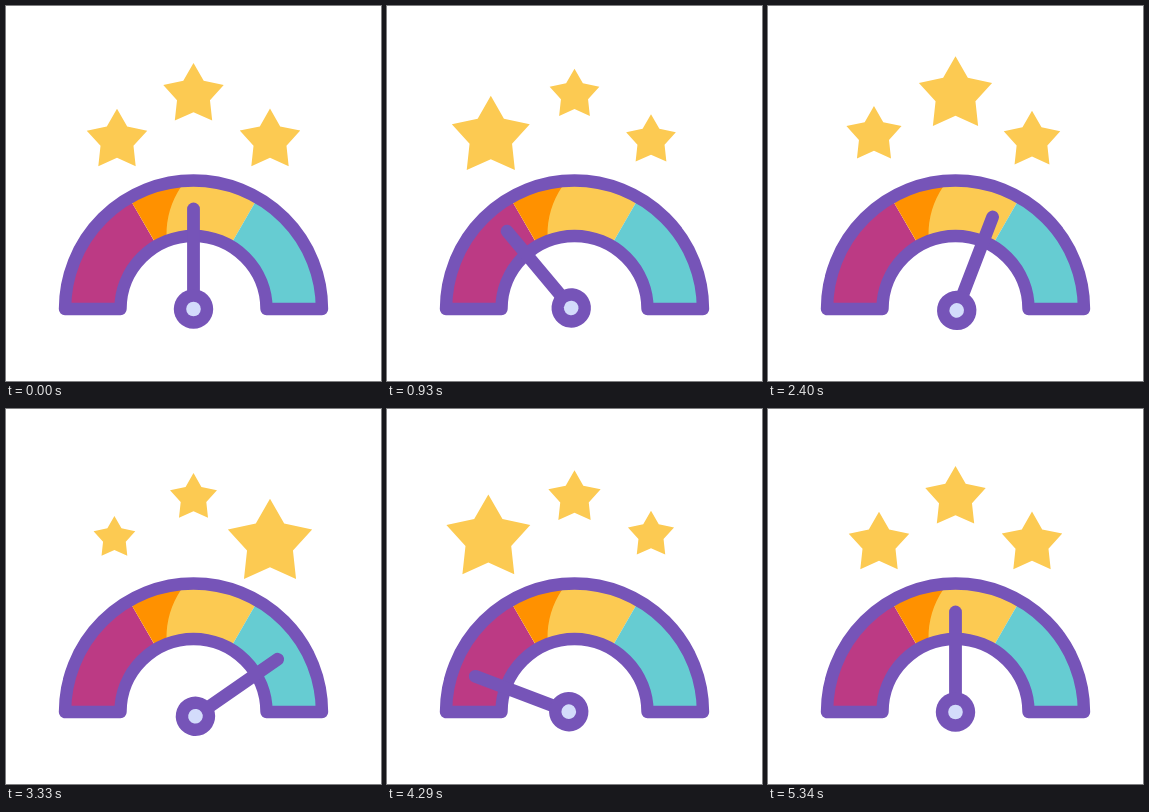
Animation, 375 px wide and 375 px high, one loop 5.4 s. Source, as an HTML page:

```html
<!DOCTYPE html>
<html lang="en">
<head>
<meta charset="utf-8">
<title>Rating gauge</title>
<style>
html, body { margin: 0; width: 100%; height: 100%; overflow: hidden; background: #fff; }
svg { display: block; width: 100vw; height: 100vh; }
</style>
</head>
<body>
<svg viewBox="0 0 375 375">
  <g id="sectors"></g>
  <path fill="#ff9100" d="M126 196.5Q149 183 175.5 180Q160 203 160.5 230L148.5 235Z"/>
  <path fill="none" stroke="#7654b8" stroke-width="12.4" stroke-linejoin="round"
    d="M59 303A128.5 128.5 0 0 1 316 303H260.5A73 73 0 0 0 114.5 303Z"/>
  <g id="stars" fill="#fcca52"></g>
  <g id="needle">
    <path d="M187.5 303V203" stroke="#7654b8" stroke-width="12.8" stroke-linecap="round"/>
    <circle cx="187.5" cy="303" r="19.7" fill="#7654b8"/>
    <circle cx="187.5" cy="303" r="7.3" fill="#d3dcfb"/>
  </g>
</svg>
<script>
const LOOP = 5400, STEP = 30;
const byId = id => document.getElementById(id);
const lerp = (a, b, p) => a + (b - a) * p;

function addPath(parent, d, fill) {
  const path = document.createElementNS('http://www.w3.org/2000/svg', 'path');
  path.setAttribute('d', d);
  if (fill) path.setAttribute('fill', fill);
  return parent.appendChild(path);
}

// Angles are in degrees, clockwise from straight up.
function polar(cx, cy, r, deg) {
  const a = deg * Math.PI / 180;
  return (cx + r * Math.sin(a)).toFixed(2) + ' ' + (cy - r * Math.cos(a)).toFixed(2);
}

function sector(from, to) {
  const p = (r, deg) => polar(187.5, 303, r, deg);
  return `M${p(128, from)}A128 128 0 0 1 ${p(128, to)}L${p(74, to)}A74 74 0 0 0 ${p(74, from)}Z`;
}

function starShape(radius) {
  const points = Array.from({ length: 10 }, (_, i) => polar(0, 0, i % 2 ? radius * 0.545 : radius, i * 36));
  return 'M' + points.join('L') + 'Z';
}

// A pose: needle angle, sizes of the three stars, and how far the outer two have drifted from home.
const pose = (angle, left, middle, right, leftDrift, rightDrift) =>
  ({ angle, left, middle, right, leftDrift, rightDrift });
const SMALL = 0.735, BIG = 1.43;
const rest = pose(0, 1, 1, 1, 0, 0);
const toLeft = pose(-59.5, BIG, SMALL, SMALL, 1, 0);
const passingRight = pose(5.5, 1, 1.4, SMALL, 1, 0);
const toRight = pose(59.8, 0.69, SMALL, BIG, 1, 0);
const passingLeft = pose(-13, 0.68, 1.4, 0.84, 1, 0.5);
const farLeft = pose(-77, BIG, SMALL, SMALL, 1, 1);
const finale = pose(0, 1, 2.03, 1, 0, 0);

// Power above 1 makes the move into that pose start gently.
const timeline = [
  { at: 0, pose: rest },
  { at: 300, pose: rest },
  { at: 1200, pose: toLeft, power: 1.12 },
  { at: 1800, pose: toLeft },
  { at: 2280, pose: passingRight },
  { at: 2700, pose: toRight },
  { at: 3300, pose: toRight },
  { at: 3780, pose: passingLeft },
  { at: 4200, pose: farLeft },
  { at: 5100, pose: finale },
  { at: 5340, pose: rest },
  { at: LOOP, pose: rest }
];

function poseAt(t) {
  const i = timeline.findIndex(key => key.at > t);
  const from = timeline[i - 1], to = timeline[i];
  const p = ((t - from.at) / (to.at - from.at)) ** (to.power || 1);
  return Object.fromEntries(Object.keys(rest).map(name =>
    [name, lerp(from.pose[name], to.pose[name], p)]));
}

['#bc3a84', '#fcca52', '#66ccd2'].forEach((fill, i) =>
  addPath(byId('sectors'), sector(i * 60 - 90, i * 60 - 30), fill));
const [leftStar, middleStar, rightStar] =
  [0, 1, 2].map(() => addPath(byId('stars'), starShape(31.8)));
const needle = byId('needle');

function place(star, x, y, size) {
  star.setAttribute('transform', `translate(${x} ${y}) scale(${size})`);
}

function draw(t) {
  const now = poseAt(t);
  // The needle turns about a point slightly off its hub.
  needle.setAttribute('transform', `rotate(${now.angle} 184.4 307)`);
  const spread = 11 * (now.left - 1);
  place(leftStar, 111 - 6 * now.leftDrift - spread, 134.5 - 5.5 * now.leftDrift, now.left);
  place(middleStar, 187.5, 88.8, now.middle);
  place(rightStar, 264, 134.4 - 9.3 * now.rightDrift, now.right);
}

const start = performance.now();
function tick() {
  const t = (performance.now() - start) % LOOP;
  draw(Math.floor(t / STEP) * STEP);
  requestAnimationFrame(tick);
}
tick();
</script>
</body>
</html>
```
